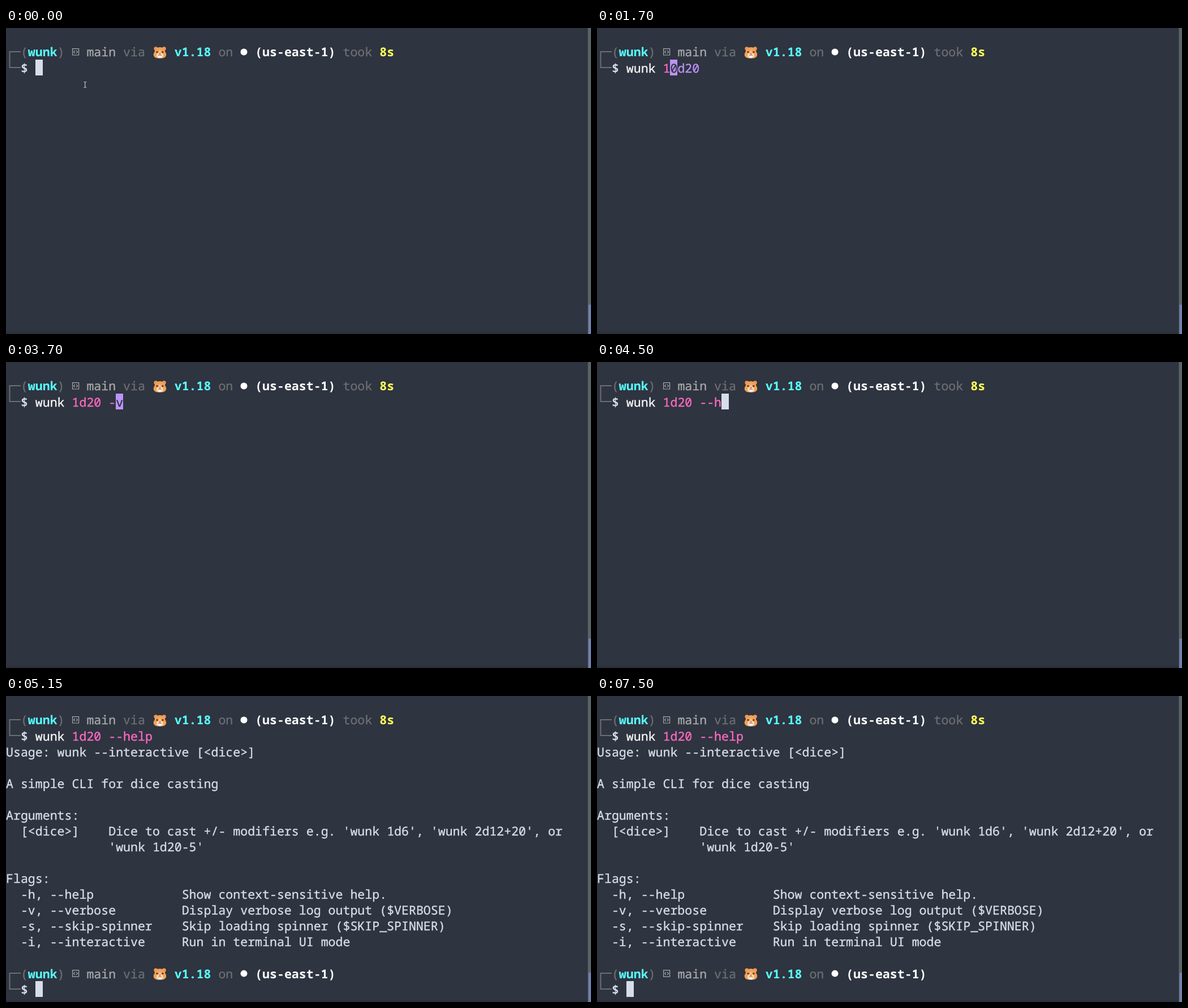
Recreate the animation shown at these times as an HTML page. Size 1034 px wide and 542 px high, loop 8 s.

```html
<!DOCTYPE html>
<html lang="en">
<head>
<meta charset="utf-8">
<title>Dice CLI terminal</title>
<style>
  html, body { margin: 0; width: 100%; height: 100%; overflow: hidden; background: #2e3440; }
  svg { display: block; width: 1034px; height: 542px; }
  text { font: 400 21.57px "Noto Sans Mono", "DejaVu Sans Mono", monospace; text-rendering: geometricPrecision; white-space: pre; stroke-width: .35px; }
  text.b { font-weight: 700; stroke-width: 0; }
</style>
</head>
<body>
<svg viewBox="0 0 1034 542">
  <defs>
    <g id="code" fill="none" stroke="#a8a8a8" stroke-width="1.2">
      <path d="M117.6 36.6h11v11.4h-11z"/>
      <path d="M122 39.8l-2.4 2.5 2.4 2.5M124.2 39.8l2.4 2.5-2.4 2.5"/>
    </g>
    <g id="hamster">
      <g fill="#f39a48"><circle cx="264.8" cy="36.6" r="3.4"/><circle cx="279.4" cy="36.6" r="3.4"/></g>
      <g fill="#e98791"><circle cx="264.8" cy="36.8" r="1.7"/><circle cx="279.4" cy="36.8" r="1.7"/></g>
      <path fill="#f3a254" d="M272 34c6 0 9 4 9.4 8.5 3.6 3.5 2 10.500-4.800 11h-9.200c-6.800-.5-8.400-7.500-4.800-11 .4-4.500 3.400-8.500 9.400-8.500z"/>
      <path fill="#fbe3c6" d="M272 38l1.200 6c3 .5 5 2.500 4.600 5-.4 3-2.800 4.500-5.800 4.500s-5.400-1.500-5.800-4.500c-.4-2.500 1.600-4.500 4.600-5z"/>
      <g fill="#3b2b28"><circle cx="267" cy="42.400" r="1.500"/><circle cx="277" cy="42.400" r="1.500"/></g>
      <ellipse cx="272" cy="45.400" rx="1.700" ry="1.200" fill="#d9636f"/>
      <path d="M269 48q1.500 1.300 3-.6 1.500 1.900 3 .6" fill="none" stroke="#7b4a3a"/>
      <path d="M270.600 49.200h2.800v2.600h-2.800z" fill="#fff"/>
    </g>
  </defs>
  <rect width="1034" height="542" fill="#2e3440"/>
  <rect y="538" width="1029" height="4" fill="#2b303b"/>
  <rect x="1028.500" width="5.500" height="542" fill="#596469"/>
  <rect x="1029.500" y="490" width="4.500" height="52" fill="#7182b0"/>
  <g id="screen"></g>
  <g id="line"></g>
  <path id="mouse" d="M137.500 95.500h1.500l.8.800.8-.800h1.500M139.800 96v9M137.500 105.300h1.500l.8-.800.8.800h1.500" fill="none" stroke="#e4e7ec"/>
</svg>
<script>
const CELL = 12.945, ROW = 28.07, BASE = 22.4, LOOP = 8000, APP = 'wunk';
const BG = '#2e3440', FG = '#d8dee9', DIM = '#6d6e70', CYAN = '#57ffff',
      PINK = '#ff6ac1', HINT = '#bd93f9', RED = '#ff5555', WHITE = '#f8f8f6';
const $ = id => document.getElementById(id);
const escapeText = s => s.replace(/&/g, '&amp;').replace(/</g, '&lt;');

// Each word sits on the character grid.
function print(col, row, str, fill = FG, bold = false) {
  let out = '';
  str.replace(/\S+/g, (word, i) => {
    const x = ((col + i) * CELL).toFixed(2), y = (row * ROW + BASE).toFixed(2);
    out += `<text x="${x}" y="${y}" fill="${fill}" stroke="${fill}"${bold ? ' class="b"' : ''}>${escapeText(word)}</text>`;
  });
  return out;
}

function prompt(row, took) {
  const top = row * ROW, dy = top - ROW;
  const y1 = Math.round(top + 14), y2 = Math.round(top + ROW + 14);
  return `<path d="M26 ${y1}H6.500V${y2}H26" fill="none" stroke="${DIM}" stroke-width="2"/>` +
    print(2, row, '(', DIM) + print(3, row, APP, CYAN, true) + print(7, row, ')', DIM) +
    `<g transform="translate(0 ${dy})"><use href="#code"/><use href="#hamster"/>` +
    '<circle cx="420.500" cy="42.500" r="6" fill="#fff"/></g>' +
    print(11, row, 'main', '#a8a8a8') + print(16, row, 'via', DIM) +
    print(23, row, 'v1.18', CYAN, true) + print(29, row, 'on', DIM) +
    print(34, row, '(us-east-1)', '#fff', true) +
    (took ? print(46, row, 'took', DIM) + print(51, row, took, '#ffff57', true) : '') +
    print(2, row + 1, '$', FG, true);
}

function block(col, row, fill) {
  const x = Math.round(col * CELL), y = Math.round(row * ROW);
  return `<rect x="${x}" y="${y}" width="13" height="${Math.round((row + 1) * ROW) - y}" fill="${fill}"/>`;
}

function command(typed, hint, lit) {
  const known = typed.startsWith(APP), n = APP.length, at = 4 + typed.length;
  let out = print(4, 2, typed.slice(0, n), known ? WHITE : RED) +
            print(4 + n, 2, typed.slice(n), PINK) + print(at, 2, hint, HINT);
  if (lit) out += block(at, 2, hint ? HINT : FG) + print(at, 2, hint.slice(0, 1), BG);
  return out;
}

const help = `Usage: ${APP} --interactive [<dice>]

A simple CLI for dice casting

Arguments:
  [<dice>]    Dice to cast +/- modifiers e.g. '${APP} 1d6', '${APP} 2d12+20', or
              '${APP} 1d20-5'

Flags:
  -h, --help            Show context-sensitive help.
  -v, --verbose         Display verbose log output ($VERBOSE)
  -s, --skip-spinner    Skip loading spinner ($SKIP_SPINNER)
  -i, --interactive     Run in terminal UI mode`;

const first = prompt(1, '8s');
const answer = first + help.split('\n').map((s, i) => print(0, 3 + i, s)).join('') + prompt(17);

// Time, typed text, suggested rest, cursor lit
const word = n => [APP.slice(0, n), APP.slice(n) + ' -i'];
const args = (s, hint = '') => [APP + ' ' + s, hint];
const steps = [
  [0, '', '', true],
  [150, '', '', false],
  [500, ...word(1), true],
  [650, ...word(2), true],
  [900, ...word(3), true],
  [1050, ...word(4), true],
  [1100, ...args('', '-i'), true],
  [1700, ...args('1', '0d20'), true],
  [2000, ...args('1d', '6+2d12+1d20-5'), true],
  [2200, ...args('1d2', '0+2d12'), true],
  [2350, ...args('1d20', '+2d12'), true],
  [2500, ...args('1d20 ', '-v'), true],
  [3050, ...args('1d20 ', '-v'), false],
  [3700, ...args('1d20 -', 'v'), true],
  [4050, ...args('1d20 --'), true],
  [4500, ...args('1d20 --h'), true],
  [4650, ...args('1d20 --he'), true],
  [4750, ...args('1d20 --hel'), true],
  [4900, ...args('1d20 --help'), true],
  [5150, ...args('1d20 --help'), true],
  [5700, ...args('1d20 --help'), false],
  [6350, ...args('1d20 --help'), true],
  [6900, ...args('1d20 --help'), false],
  [7500, ...args('1d20 --help'), true]
];

let shown = -1, wasDone = null;
function draw(now) {
  const t = now % LOOP;
  let i = steps.length - 1;
  while (steps[i][0] > t) i--;
  if (i !== shown) {
    shown = i;
    const [time, typed, hint, lit] = steps[i], done = time >= 5150;
    if (done !== wasDone) $('screen').innerHTML = done ? answer : first;
    wasDone = done;
    $('line').innerHTML = command(typed, hint, lit && !done) + (done && lit ? block(4, 18, FG) : '');
    $('mouse').style.display = time < 500 ? '' : 'none';
  }
}

const start = performance.now();
function tick() {
  draw(performance.now() - start);
  requestAnimationFrame(tick);
}
tick();
</script>
</body>
</html>
```
